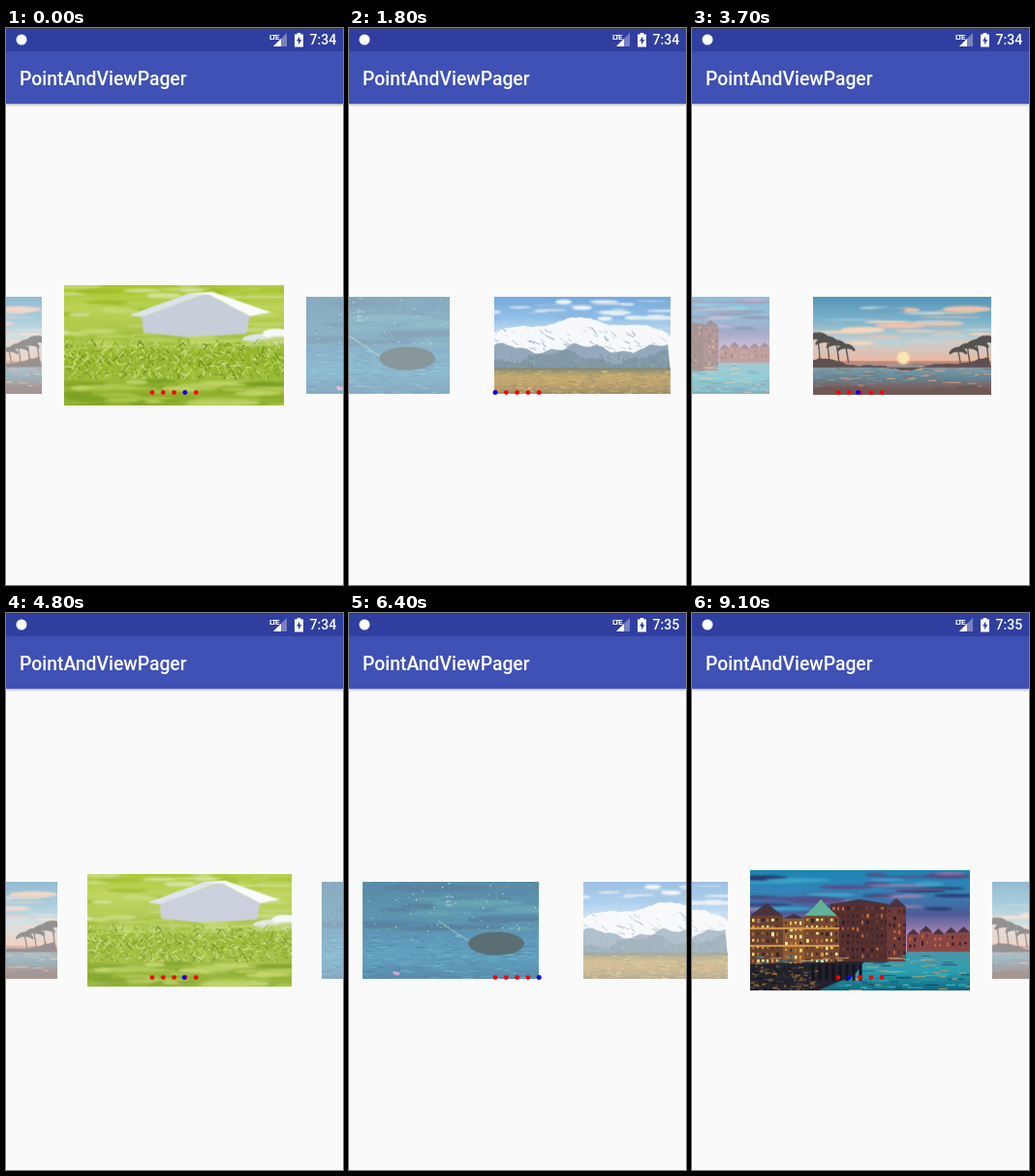
These frames come from a looping animation (348 by 574 pixels, 9.5 s). An HTML page with a canvas:

```html
<!DOCTYPE html>
<html lang="en">
<head>
<meta charset="utf-8">
<title>PointAndViewPager</title>
<style>
  html, body { margin: 0; width: 100%; height: 100%; overflow: hidden; background: #fafafa; }
  body { position: relative; font-family: Roboto, sans-serif; font-weight: 500; color: #fff; }
  .status { position: absolute; top: 0; left: 0; width: 348px; height: 24px; background: #303f9f; box-shadow: inset 0 1px #34384f; }
  .bar { position: absolute; top: 24px; left: 0; width: 348px; height: 54.4px; background: #3f51b5; box-shadow: 0 1px 2.5px rgba(0, 0, 0, .38); }
  .title { position: absolute; left: 14px; top: 1px; font-size: 19.33px; line-height: 55px; white-space: nowrap; }
  #clock { position: absolute; left: 313.5px; top: 0; font-size: 14px; line-height: 25px; }
  svg, canvas { position: absolute; left: 0; top: 0; }
  canvas { width: 348px; height: 574px; }
</style>
</head>
<body>
<canvas id="stage"></canvas>
<div class="bar"><span class="title">PointAndViewPager</span></div>
<div class="status">
  <svg width="348" height="24" fill="#fff">
    <circle cx="16" cy="12" r="5.5"/>
    <text x="272" y="11.5" font-size="8" font-weight="700" font-family="Roboto, sans-serif" letter-spacing="-1.2">LTE</text>
    <path d="M276 19L290 5V19Z" opacity=".35"/>
    <path d="M276 19L284 11V19Z"/>
    <path d="M298 6.5h2.7V5h3.6v1.5h2.7V19.5h-9Z"/>
    <path d="M303.3 8.5l-3.3 5h2v3.8l3.3-5.3h-2Z" fill="#303f9f"/>
  </svg>
  <span id="clock">7:34</span>
</div>
<script>
const W = 227, H = 124.4, GAP = 227.5, CX = 173.5, CY = 327.2;
const LOOP = 9500, STEP = 100, RES = 2, TAU = Math.PI * 2;

let seed = 7;
const rnd = (a = 0, b = 1) => {
  seed = (seed * 16807) % 2147483647;
  return a + (b - a) * seed / 2147483647;
};
const pick = list => list[Math.floor(rnd(0, list.length))];

// Drawing helpers, all working on the current picture's context
let g;
const rect = (x, y, w, h, fill) => { g.fillStyle = fill; g.fillRect(x, y, w, h); };
const fade = (y, h, ...colors) => {
  const grad = g.createLinearGradient(0, y, 0, y + h);
  colors.forEach((c, i) => grad.addColorStop(i / (colors.length - 1), c));
  rect(0, y, W, h, grad);
};
const poly = (fill, ...p) => {
  g.fillStyle = fill;
  g.beginPath();
  for (let i = 0; i < p.length; i += 2) g.lineTo(p[i], p[i + 1]);
  g.fill();
};
const oval = (x, y, rx, ry, fill) => {
  g.fillStyle = fill;
  g.beginPath();
  g.ellipse(x, y, rx, ry, 0, 0, TAU);
  g.fill();
};
const line = (x1, y1, x2, y2, color, w = 1) => {
  g.strokeStyle = color;
  g.lineWidth = w;
  g.beginPath();
  g.moveTo(x1, y1);
  g.lineTo(x2, y2);
  g.stroke();
};
const soft = (blur, draw) => {
  g.filter = `blur(${blur}px)`;
  draw();
  g.filter = 'none';
};
const scatter = (n, top, bottom, draw) => {
  for (let i = 0; i < n; i++) draw(rnd(-5, W), rnd(top, bottom));
};
const ripples = (n, top, bottom, len, ...colors) => scatter(n, top, bottom, (x, y) =>
  line(x, y, x + rnd(len / 4, len), y, pick(colors), rnd(.5, 1.4)));
const clouds = (n, top, bottom, thick, ...colors) => soft(2, () => scatter(n, top, bottom, (x, y) =>
  oval(x, y, thick * rnd(3, 10), rnd(.5, thick), pick(colors))));
// Jagged skyline filled down to the bottom edge
const ridge = (fill, y, amp, freq, phase, bottom) => {
  const p = [0, bottom];
  for (let x = 0; x <= W; x += 4)
    p.push(x, y - amp * (Math.sin(x * freq + phase) + .4 * Math.sin(x * freq * 3.3)) + rnd(-1, 1));
  poly(fill, ...p, W, bottom);
};

function mountain() {
  fade(0, 50, '#3f86cc', '#5fa4df', '#b9d8ee');
  clouds(28, 2, 30, 3, '#e9f2f8', '#cfe2f0', '#5b9ad2', '#dce9f3');
  ridge('#f4f7fb', 38, 9, .022, -.9, 95);
  scatter(110, 38, 66, (x, y) =>
    line(x, y, x + rnd(3, 9), y + rnd(2, 7), pick(['#7f9ab5', '#a9bdd0', '#fff']), rnd(.5, 1.5)));
  ridge('#6886a0', 66, 5, .06, 1, 95);
  ridge('#4e7083', 77, 7, .045, 4, 95);
  scatter(120, 72, 91, (x, y) =>
    line(x, y, x + rnd(-6, 6), y + rnd(2, 6), pick(['#365866', '#6f8f9f', '#41616f']), .8));
  fade(91, 34, '#4a5538', '#b08a36', '#a07a30', '#6b5c30');
  ripples(420, 95, 124, 8, '#cb9f42', '#6f6230', '#94762d', '#b88d40');
}

function building(x, w, top, bottom, wall, glass, roof = 5) {
  rect(x, top, w, bottom - top, wall);
  poly('#4a3340', x, top, x + w / 2, top - roof, x + w, top);
  for (let j = top + 3; j < bottom - 4; j += 7)
    for (let i = x + 2; i < x + w - 2; i += 5) rect(i, j, rnd(1.5, 3), rnd(2, 4.5), pick(glass));
}

function city() {
  const lit = ['#ffd562', '#e8963a', '#4a2a26', '#b5683a', '#ffe9a0', '#33222a'];
  const dim = ['#2c1b26', '#b8693c', '#46262b', '#3a2530', '#70403a'];
  fade(0, 90, '#1d86b4', '#3484b8', '#4d5c98', '#b487b4', '#dda0a4');
  clouds(34, 3, 42, 3.5, '#26396c', '#35427a', '#3aa3c8', '#544f88', '#a583b0');
  fade(84, 41, '#4f95a8', '#2a9fb0', '#10637c');
  for (let x = 162; x < W; x += 13) building(x, 13, rnd(62, 68), 84, '#8a4646', dim, 6);
  building(83, 60, 35, 95, '#55302f', dim);
  building(141, 20, 38, 94, '#6d3938', dim, 9);
  building(0, 34, 47, 100, '#66432f', lit, 13);
  building(34, 22, 50, 100, '#8a5a34', lit);
  building(56, 36, 47, 100, '#74492f', lit, 4);
  for (let y = 59; y < 90; y += 18) rect(0, y, 92, 2, '#d99a4a');
  poly('#5fb39a', 56, 47, 66, 38, 73, 30, 80, 38, 90, 47);
  ripples(150, 88, 124, 16, '#45bcc6', '#0d4a62', '#c9a06a', '#2b9eae');
  poly('#22222c', 0, 97, 118, 94, 108, 108, 70, 124, 0, 124);
  scatter(130, 98, 124, (x, y) => rect(x * .3, y, rnd(2, 6), rnd(1, 2), pick(['#17161f', '#5d4934', '#8f6638', '#35303a'])));
  for (let x = 65; x < 115; x += 7) line(x, 97, x, 114, '#12141c', 3);
}

function palm(x, y, size) {
  line(x, y, x + 3, 84, '#2c2425', 1.6);
  for (let i = 0; i < 11; i++) {
    const a = Math.PI * (1 + i / 10), dx = Math.cos(a) * size, dy = Math.sin(a) * size;
    g.strokeStyle = '#2e2a27';
    g.lineWidth = 2.6;
    g.beginPath();
    g.moveTo(x, y);
    g.quadraticCurveTo(x + dx * .7, y + dy * .7, x + dx, y + dy * .4 + 4);
    g.stroke();
  }
}

function beach() {
  fade(0, 85, '#2f7da8', '#5a9fc0', '#b9c6c8', '#eda584');
  clouds(26, 14, 60, 4, '#e9b59a', '#a9c6d0', '#f3cfae', '#4d8fb3');
  fade(82, 43, '#c8694e', '#5c8494', '#3f6a7c', '#5c3f3c', '#4a2f2e');
  ripples(150, 84, 114, 15, '#d98f6b', '#3e6d7b', '#6b4a48', '#54808e');
  soft(2, () => oval(115, 78, 8, 8, '#ffe1a0'));
  ridge('#38292a', 86, 6, .0277, 1.57, 90);
  for (let i = 0; i < 4; i++) {
    palm(6 + i * 12, 53 + i * 4, 17 - i * 2);
    palm(221 - i * 12, 57 + i * 4, 17 - i * 2);
  }
  ridge('#4e3331', 117, 3, .04, 0, H);
}

function meadow() {
  fade(0, H, '#a9c62c', '#bdd256', '#a9c547', '#93b52c', '#9cba38', '#8db02e');
  clouds(90, 0, 58, 3, '#c3d872', '#9dbd2a', '#b4cf4c', '#d2e29a');
  soft(1, () => {
    poly('#c6ced9', 80, 32, 148, 9, 192, 32, 188, 50, 130, 54, 82, 49);
    poly('#dde3ea', 67, 31, 128, 9, 150, 8, 80, 33);
    poly('#fafbfd', 128, 9, 153, 7, 213, 28, 192, 32, 150, 10);
    oval(207, 56, 23, 6, '#dfe6ea');
    oval(219, 50, 14, 5, '#f7f9fc');
  });
  clouds(30, 54, 64, 2, '#c3d872', '#a5c345', '#b6cf66');
  scatter(900, 60, 98, (x, y) =>
    line(x, y, x + rnd(-6, 6), y - rnd(0, 6), pick(['#7ea322', '#a9c940', '#d3e384', '#658a1c', '#bcd552', '#c5d98a']), rnd(.5, 1.2)));
  clouds(80, 98, 124, 3, '#8aac28', '#abc74c', '#7ba024', '#bdd362');
}

function night() {
  fade(0, 68, '#155c80', '#1a678c', '#1c6c94');
  clouds(36, 5, 64, 6, '#1c6f90', '#14507b', '#287c98', '#175a8a');
  fade(66, 59, '#1a6a9a', '#1f7ca6', '#145a8c');
  ripples(260, 67, 124, 16, '#3898bb', '#17588c', '#2686b0', '#124d79');
  scatter(110, 0, 64, (x, y) => oval(x, y, rnd(.3, .9), rnd(.3, .9), pick(['#b9e4dc', '#6fbcc0', '#e9f6e2'])));
  g.fillStyle = '#cfe6e2';
  g.font = '4px Roboto, sans-serif';
  ['in the', 'still', 'night'].forEach((s, i) => g.fillText(s, 107, 20 + i * 5.5));
  line(97, 50, 150, 85, '#8fb9a0');
  oval(172, 79, 36, 15, '#17323a');
  for (let i = 0; i < 9; i++) oval(rnd(35, 46), rnd(115, 119), 1.5, 1, '#d883c4');
}

const pages = [mountain, city, beach, meadow, night].map(draw => {
  const c = document.createElement('canvas');
  c.width = W * RES;
  c.height = Math.round(H * RES);
  g = c.getContext('2d');
  g.scale(RES, RES);
  draw();
  return c;
});

// A fling follows the finger slowly, then settles; a higher snap settles sooner
const fling = (u, snap) => 1 - (1 - u ** 1.7) ** snap;
const bounce = u => .328 * Math.sin(Math.PI * u ** .8);

const swipes = [
  { start: 800, steps: 7 },
  { start: 1600, steps: 7 },
  { start: 2600, steps: 6, snap: 4.1 },
  { start: 3400, steps: 8 },
  { start: 4500, steps: 8, snap: 7.2 },
  { start: 5500, steps: 7 },
  { start: 6300, steps: 7, move: bounce },
  { start: 7100, steps: 8, snap: 2.63 },
  { start: 8200, steps: 7 }
];

function position(t) {
  return swipes.reduce((pos, { start, steps, snap = 4.5, move = fling }) => {
    if (t < start) return pos;
    const step = Math.floor((t - start) / STEP) + 1;
    return pos + move(Math.min(1, step / steps), snap);
  }, 3);
}

const stage = document.getElementById('stage');
const clock = document.getElementById('clock');
const dpr = window.devicePixelRatio || 1;
stage.width = 348 * dpr;
stage.height = 574 * dpr;
const ctx = stage.getContext('2d');
ctx.scale(dpr, dpr);
ctx.imageSmoothingQuality = 'high';

function dot(i, color) {
  ctx.fillStyle = color;
  ctx.beginPath();
  ctx.arc(151 + i * 11.3, 375.6, 2.4, 0, TAU);
  ctx.fill();
}

function render(t) {
  const pos = position(t), first = Math.floor(pos) - 1;
  ctx.clearRect(0, 0, 348, 574);
  for (let i = first; i < first + 4; i++) {
    const far = Math.abs(i - pos), s = Math.max(.8, 1 - far);
    ctx.globalAlpha = Math.max(.5, 1 - far);
    ctx.drawImage(pages[i % 5], CX + (i - pos) * GAP - W * s / 2, CY - H * s / 2, W * s, H * s);
  }
  ctx.globalAlpha = 1;
  for (let i = 0; i < 5; i++) dot(i, '#f00');
  // The blue dot jumps back once the last page is more than half gone
  const at = pos % 5;
  dot(at > 4.5 ? 0 : Math.min(at, 4), '#00f');
  clock.textContent = t < 5600 ? '7:34' : '7:35';
}

const begin = performance.now();
function tick() {
  render((performance.now() - begin) % LOOP);
  requestAnimationFrame(tick);
}
tick();
</script>
</body>
</html>
```
